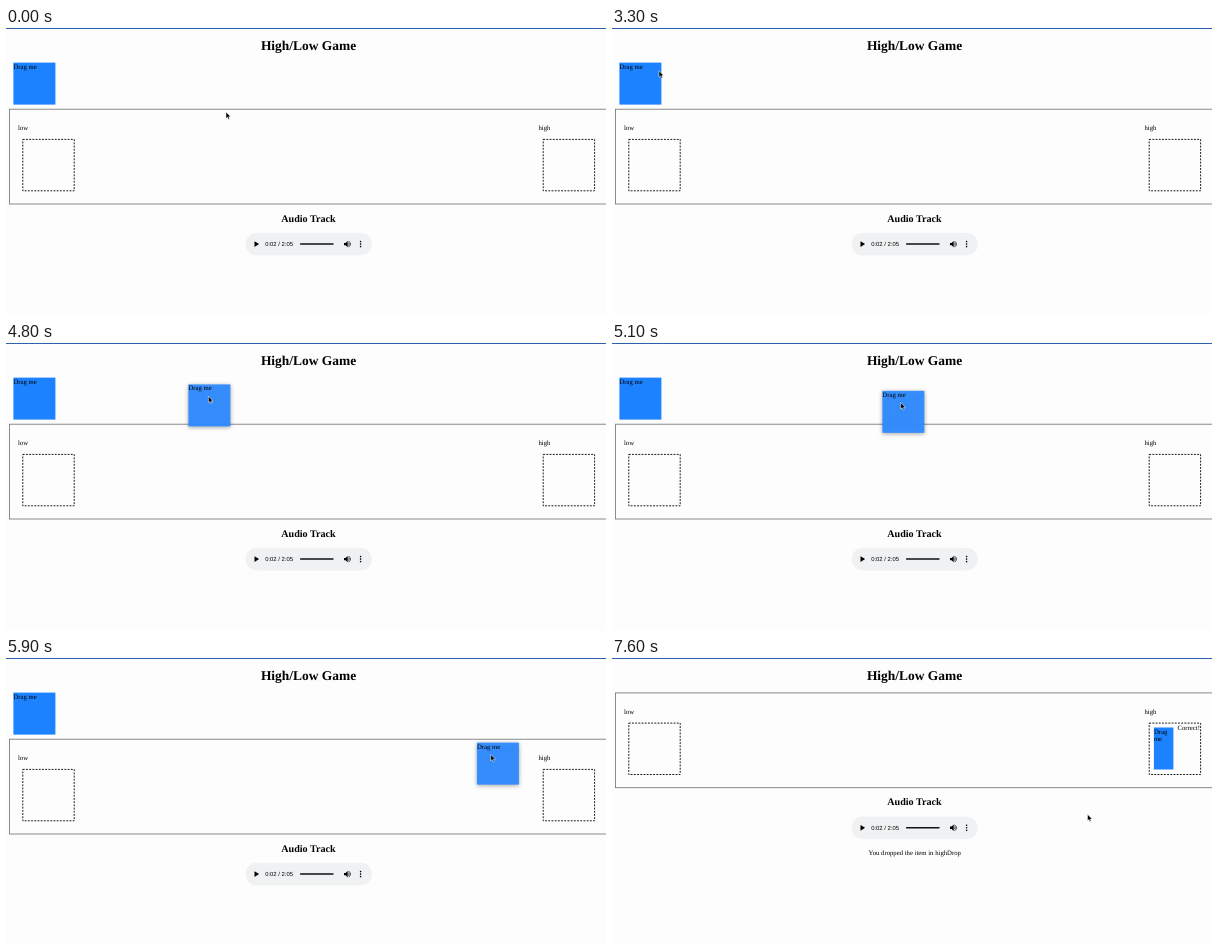
These frames come from a looping animation (600x287 px, 8 s). An HTML page:

```html
<!DOCTYPE html>
<html lang="en">
<head>
<meta charset="utf-8">
<title>High/Low Game</title>
<style>
html, body { margin: 0; width: 100%; height: 100%; overflow: hidden; background: #fefdfe; }
svg { display: block; width: 100vw; height: 100vh; }
text {
  font: 6.72px "Liberation Serif", "Times New Roman", serif;
  fill: #000;
  text-rendering: geometricPrecision;
}
.h1 { font-size: 13.44px; font-weight: bold; }
.h2 { font-size: 10.08px; font-weight: bold; }
.mid { text-anchor: middle; }
.time { font: 5.88px "Liberation Sans", Arial, sans-serif; }
.slot { fill: none; stroke: #000; stroke-width: .9; stroke-dasharray: 1.9 1.3; }
#ghost { filter: drop-shadow(0 1.6px 2.2px rgba(0, 0, 0, .38)); }
</style>
</head>
<body>
<svg viewBox="0 0 600 287">
  <rect width="600" height="1" fill="#2f60ae"/>
  <text class="h1 mid" x="302.5" y="22">High/Low Game</text>

  <g id="box">
    <rect width="42" height="42" x="7.4" y="34.6" fill="#1c82ff"/>
    <text x="7.4" y="40.5">Drag me</text>
  </g>

  <g id="page">
    <rect x="3.5" y="81.2" width="610" height="94.8" fill="none" stroke="#777" stroke-width=".85"/>
    <text x="12" y="102.3">low</text>
    <text x="532.5" y="102.3">high</text>
    <rect class="slot" x="16.8" y="111.4" width="51.4" height="51.4"/>
    <rect class="slot" x="537.2" y="111.4" width="51.4" height="51.4"/>
    <text class="h2 mid" x="302.4" y="193.6">Audio Track</text>
    <rect x="239.6" y="204.8" width="126.2" height="22.7" rx="11.35" fill="#f0f1f2"/>
    <path d="M248.5 213.2v5.8l4.6-2.9z"/>
    <text class="time" x="259.2" y="218.1">0:02 / 2:05</text>
    <rect x="293.9" y="215.2" width="33.8" height="1.6" rx=".8" fill="#111"/>
    <path d="M338 214.9h1.6l2.1-2v6.4l-2.1-2H338z"/>
    <path d="M342.5 214.7q1.3 1.4 0 2.8M342.5 213q3.9 3.1 0 6.2" fill="none" stroke="#000" stroke-width=".75"/>
    <path d="M354.6 213.6v0M354.6 216.1v0M354.6 218.6v0" stroke="#000" stroke-width="1.6" stroke-linecap="round"/>
  </g>

  <g id="result">
    <rect x="541.9" y="69.5" width="19.5" height="42" fill="#1c82ff"/>
    <text x="541.9" y="75.6">Drag</text>
    <text x="541.9" y="83.3">me</text>
    <text x="565.5" y="71.8">Correct!</text>
    <text class="mid" x="302.7" y="197.2">You dropped the item in highDrop</text>
  </g>

  <g id="ghost">
    <rect width="42" height="42" fill="#2f8cff" fill-opacity=".95"/>
    <text y="5.9">Drag me</text>
  </g>

  <g id="cursor">
    <path d="M0 0V6.5L1.5 5.2 2.5 7.4 3.6 6.9 2.7 4.8H4.7Z" stroke="#fff" stroke-width=".5"/>
    <g id="badge">
      <circle cx="4.2" cy="7.6" r="4.1" fill="#2fa52f"/>
      <path d="M4.2 5.4v4.4M2 7.6h4.4" stroke="#fff"/>
    </g>
  </g>
</svg>
<script>
const LOOP = 8000, STEP = 100;
const GRAB = 4300, DROP = 6700, LIFT = 46.3;

// Where the hand turns or changes pace
const stops = [
  { t: 900, x: 220, y: 84 },
  { t: 1500, x: 215.4, y: 58.2 },
  { t: 2600, x: 51, y: 44 },
  { t: 3300, x: 47, y: 42.8 },
  { t: GRAB, x: 31, y: 46.4 },
  { t: 4800, x: 202.4, y: 53.2 },
  { t: 5500, x: 388, y: 71.7 },
  { t: 6400, x: 555.3, y: 121 },
  { t: 7200, x: 552, y: 122 },
  { t: 7600, x: 475.5, y: 156.3 }
];

const el = id => document.getElementById(id);
const [box, page, result, ghost, cursor, badge] =
  ["box", "page", "result", "ghost", "cursor", "badge"].map(el);

function slope(i, axis) {
  const a = stops[i], b = stops[i + 1];
  return a && b ? (b[axis] - a[axis]) / (b.t - a.t) : 0;
}

// Harmonic mean of both sides, so the curve never overshoots a stop
function tangent(i, axis) {
  const a = slope(i - 1, axis), b = slope(i, axis);
  return a * b > 0 ? 2 * a * b / (a + b) : 0;
}

function along(t, axis) {
  const next = stops.findIndex(s => s.t > t);
  if (next === 0) return stops[0][axis];
  if (next < 0) return stops[stops.length - 1][axis];
  const a = stops[next - 1], b = stops[next];
  const span = b.t - a.t, u = (t - a.t) / span, v = 1 - u;
  return a[axis] * v * v * (1 + 2 * u) + b[axis] * u * u * (3 - 2 * u)
    + span * u * v * (tangent(next - 1, axis) * v - tangent(next, axis) * u);
}

// The dragged copy slowly slips under the pointer
const gripX = t => 20 - 9 * (Math.min(t, 6400) - 4800) / 1600;
const gripY = 11.8;

const move = (node, x, y) => node.setAttribute("transform", `translate(${x} ${y})`);
const show = (node, on) => node.setAttribute("display", on ? "inline" : "none");

function draw(now) {
  const t = Math.floor((now % LOOP) / STEP) * STEP;
  const dropped = t >= DROP;
  const dragging = t >= GRAB && !dropped;
  const x = along(t, "x"), y = along(t, "y");

  move(cursor, x, y);
  move(ghost, x - gripX(t), y - gripY);
  move(page, 0, dropped ? -LIFT : 0);
  show(box, !dropped);
  show(result, dropped);
  show(ghost, dragging);
  show(badge, dragging && x > 537 && y > 111);
}

const start = performance.now();
function tick() {
  draw(performance.now() - start);
  requestAnimationFrame(tick);
}
tick();
</script>
</body>
</html>
```
